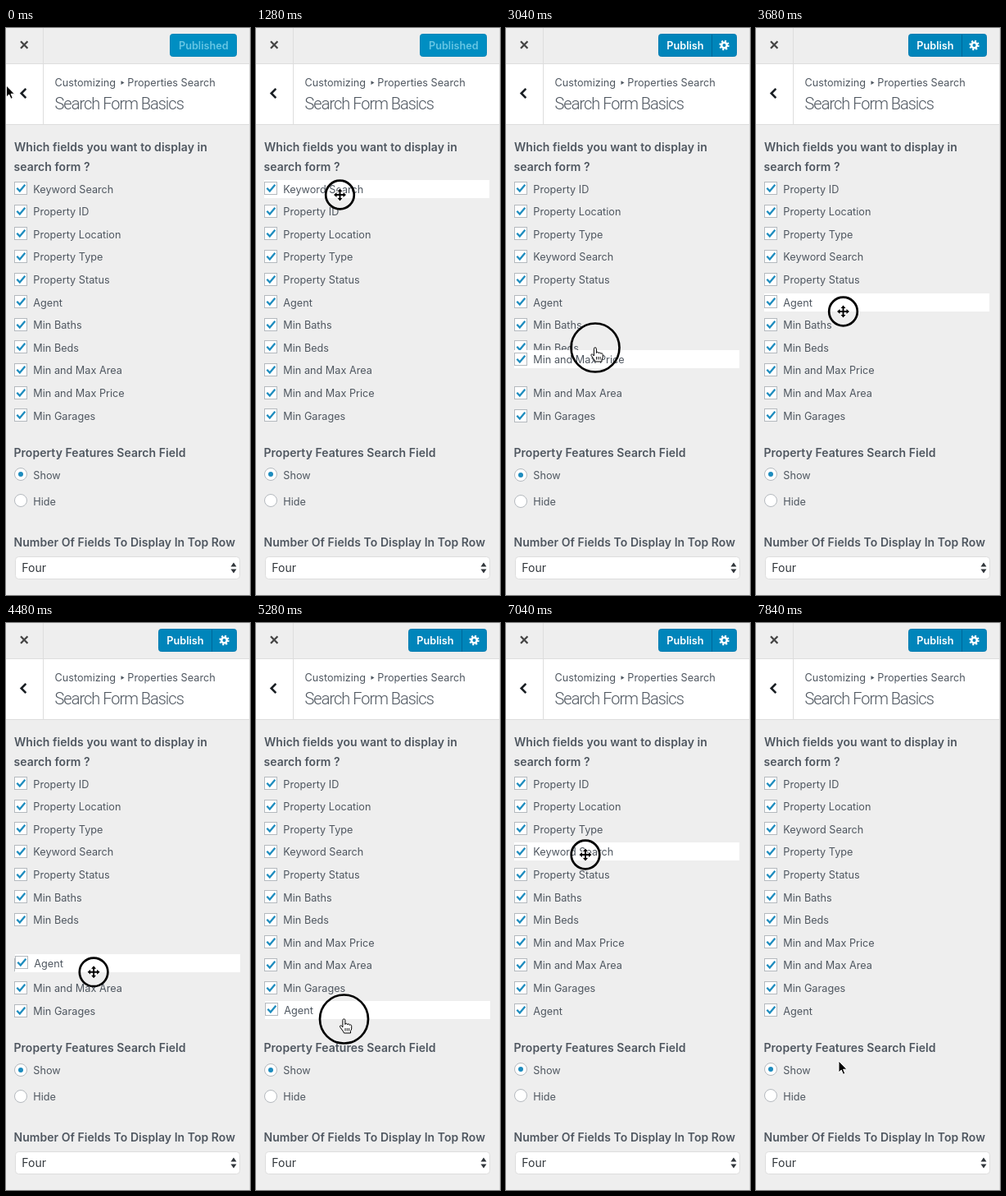
Animation of 298x690 px, one loop 8000 ms. Source, as an HTML page:

```html
<!DOCTYPE html>
<html lang="en">
<head>
<meta charset="utf-8">
<title>Sortable search fields</title>
<style>
  html, body { margin: 0; width: 100%; height: 100%; overflow: hidden; background: #eee; }
  svg { display: block; width: 298px; height: 690px; }
  text { font: 12.7px Inter, "Open Sans", sans-serif; fill: #4f5760; }
  .heading { font-size: 14px; font-weight: 600; letter-spacing: .04px; }
  .title { font: 300 20px Roboto, sans-serif; letter-spacing: -1px; }
  .button { font-weight: 600; fill: #fff; }
  .value { font-size: 14px; fill: #32373c; }
  .box { fill: #fff; stroke: #b4b9be; }
  .tick { fill: none; stroke: #1e8cbe; stroke-width: 2.3; }
  .rule { fill: none; stroke: #ddd; }
</style>
</head>
<body>
<svg viewBox="0 0 298 690">
  <rect width="298" height="690" fill="#eee"/>
  <rect y="44" width="298" height="73" fill="#fff"/>
  <path class="rule" d="M0 43.5H298M0 117.5H298M45.5 0V117M297.5 0V690"/>
  <path d="M18 16.3l8.4 8.4m0-8.4l-8.4 8.4" stroke="#444" stroke-width="2.3"/>
  <path d="M24.3 73.8l-5.6 5.7 5.6 5.7" fill="none" stroke="#191e23" stroke-width="2.6"/>

  <g id="published">
    <rect x="200.5" y="7.5" width="81" height="27" rx="3" fill="#008ec2" stroke="#0085b8"/>
    <text class="button" x="211" y="25.7" style="fill:#66c6e4">Published</text>
  </g>
  <g id="publish">
    <rect x="186.5" y="7.5" width="95" height="27" rx="3" fill="#0085ba" stroke="#007cb2"/>
    <path d="M251.5 8V35" stroke="#006799"/>
    <text class="button" x="196.3" y="25.7">Publish</text>
    <g fill="none" stroke="#fff">
      <circle cx="266.5" cy="21" r="3.3" stroke-width="2.6"/>
      <circle cx="266.5" cy="21" r="5.2" stroke-width="2" stroke-dasharray="2.04"/>
    </g>
  </g>

  <text x="59.5" y="71">Customizing</text>
  <path d="M140.5 64.2l4 2.4-4 2.4z" fill="#4f5760"/>
  <text x="148.3" y="71">Properties Search</text>
  <text class="title" x="59.5" y="99">Search Form Basics</text>

  <text class="heading" x="10" y="150">Which fields you want to display in</text>
  <text class="heading" x="9.5" y="174">search form ?</text>

  <text class="heading" x="9.5" y="522">Property Features Search Field</text>
  <g id="radios">
    <circle class="box" cx="18" cy="543" r="7.5"/>
    <circle cx="18" cy="543" r="3" fill="#1e8cbe"/>
    <circle class="box" cx="18" cy="575" r="7.5"/>
  </g>
  <text x="33.3" y="549">Show</text>
  <text x="33.3" y="581">Hide</text>

  <text class="heading" x="9.5" y="631">Number Of Fields To Display In Top Row</text>
  <rect x="11.5" y="643.5" width="274" height="27" rx="4" fill="#fff" stroke="#ddd"/>
  <text class="value" x="19.3" y="662">Four</text>
  <path d="M274.5 655.5l3.5-5 3.5 5zM274.5 658.5l3.5 5 3.5-5z" fill="#32373c"/>

  <g id="rows"></g>

  <g id="pointer">
    <circle id="ring" fill="none" stroke="#000" stroke-width="2.7"/>
    <path id="arrow" d="M0 0V14L3.2 11L5.5 16.3L7.8 15.3L5.6 10.2H10Z" stroke="#fff"/>
    <g id="hand" stroke="#000" stroke-linejoin="round">
      <path fill="#fff" d="M-1.6 10V1.4a1.5 1.5 0 0 1 3 0V6.5c0-1.6 2.8-1.6 2.8.3c.2-1.3 2.7-1 2.7.6c.3-1 2.3-.6 2.3.9V12L8 14.5V17H0L-1 15L-5 9.5C-5.6 7.8-3.4 7.5-2.5 8.8Z"/>
      <path d="M1.5 11v3.5M3.8 11v3.5M6.1 11v3.5" stroke-width=".9"/>
    </g>
    <path id="move" stroke="#fff" stroke-width="1.6" paint-order="stroke"
      d="M0-7.5L3-4H1V-1H4V-3L7.5 0L4 3V1H1V4H3L0 7.5L-3 4H-1V1H-4V3L-7.5 0L-4-3V-1H-1V-4H-3Z"/>
  </g>
</svg>
<script>
const LOOP = 8000, STEP = 160, REACTION = 100, PITCH = 27.6, FIRST_ROW = 195.6;
const $ = id => document.getElementById(id);

const labels = ["Keyword Search", "Property ID", "Property Location", "Property Type",
  "Property Status", "Agent", "Min Baths", "Min Beds", "Min and Max Area",
  "Min and Max Price", "Min Garages"];

// Each drag grabs the row in slot `from`; `rest` is the pause after letting go.
const drags = [
  { from: 0, start: 1280, end: 2080, grab: [102.5, 203], drop: [106, 281] },
  { from: 9, start: 2720, end: 3040, grab: [109, 430], drop: [109, 389] },
  { from: 5, start: 3680, end: 5280, grab: [106.5, 345], drop: [107.5, 482], rest: 320 },
  { from: 3, start: 7040, end: 7360, grab: [97, 282], drop: [99, 251] }
];

// The pointer waits one step on the row before a drag and one step before the release.
const stops = [
  { t: 0, at: [0.5, 70] },
  ...drags.flatMap(({ start, end, grab, drop, rest = 0 }) => [
    { t: start - STEP, at: grab }, { t: start, at: grab },
    { t: end - STEP, at: drop }, { t: end + rest, at: drop }
  ]),
  { t: 7840, at: [101, 533] }
];

const smooth = k => k * k * (3 - 2 * k);
const slotY = slot => FIRST_ROW + slot * PITCH;
const show = (id, on) => $(id).style.display = on ? "" : "none";

function pointerAt(t) {
  const i = stops.findIndex(stop => stop.t > t);
  if (i < 0) return stops.at(-1).at;
  const a = stops[i - 1], b = stops[i];
  const k = smooth((t - a.t) / (b.t - a.t));
  return a.at.map((v, axis) => v + (b.at[axis] - v) * k);
}

const rows = labels.map(label => {
  const row = document.createElementNS("http://www.w3.org/2000/svg", "g");
  row.innerHTML = `<rect x="10" y="-11" width="275" height="22" fill="#fff"/><g>
    <rect class="box" x="10.5" y="-7.5" width="15" height="15"/>
    <path class="tick" d="M13.3-.2L16.8 3.6L23.3-4.3"/></g>
    <text x="33.3" y="5">${label}</text>`;
  $("rows").append(row);
  return row;
});

function place(row, x, y, highlighted) {
  const [back, box, text] = row.children;
  const put = (part, top) => part.setAttribute("transform", `translate(${Math.round(x)} ${Math.round(top)})`);
  put(back, y);
  put(box, y - 0.4);
  put(text, y);
  back.style.display = highlighted ? "" : "none";
}

function hoveredSlot([x, y]) {
  const slot = Math.round((y - FIRST_ROW) / PITCH);
  return x > 10 && Math.abs(y - slotY(slot)) <= 11 ? slot : -1;
}

// Moves the row by as many slots as the pointer has travelled; returns its slot.
function reorder(list, { from, grab }, y) {
  const to = Math.round(from + (y - grab[1]) / PITCH);
  list.splice(to, 0, ...list.splice(from, 1));
  return to;
}

function draw(t) {
  const [x, y] = pointerAt(t);
  const seen = pointerAt(Math.max(0, t - REACTION)); // the page lags the pointer
  const order = [...rows];
  drags.filter(d => t > d.end).forEach(d => reorder(order, d, d.drop[1]));

  const drag = drags.find(d => t >= d.start && t <= d.end);
  const lifted = drag && t > drag.start;
  const held = drag && order[drag.from];
  let gap = -1;
  if (drag) {
    place(held, x - drag.grab[0], slotY(drag.from) + Math.round(y - drag.grab[1]), true);
    gap = reorder(order, drag, seen[1]);
    if (held !== $("rows").lastChild) $("rows").append(held);
  }
  const hovered = drag ? -1 : hoveredSlot(seen);
  order.forEach((row, slot) => {
    const swell = lifted && slot > gap ? 0.4 : 0; // the gap is a little taller than a row
    if (row !== held) place(row, 0, slotY(slot) + swell, slot === hovered);
  });
  $("radios").setAttribute("transform", `translate(0 ${lifted ? 1 : 0})`);

  const pressing = drags.some(d => t === d.start - STEP);
  const releasing = drag && t === drag.end;
  const moving = drag && !releasing;
  const overRows = x > 10 && y > 185 && y < 484;
  show("ring", drag || pressing);
  $("ring").setAttribute("r", releasing ? 29.5 : pressing ? 23.5 : 17.3);
  show("move", moving);
  show("hand", !moving && overRows);
  show("arrow", !moving && !overRows);
  $("pointer").setAttribute("transform", `translate(${x} ${y})`);

  const changed = t > drags[0].end;
  show("published", !changed);
  show("publish", changed);
}

function tick() {
  draw(Math.floor(performance.now() % LOOP / STEP) * STEP);
  requestAnimationFrame(tick);
}
tick();
</script>
</body>
</html>
```
